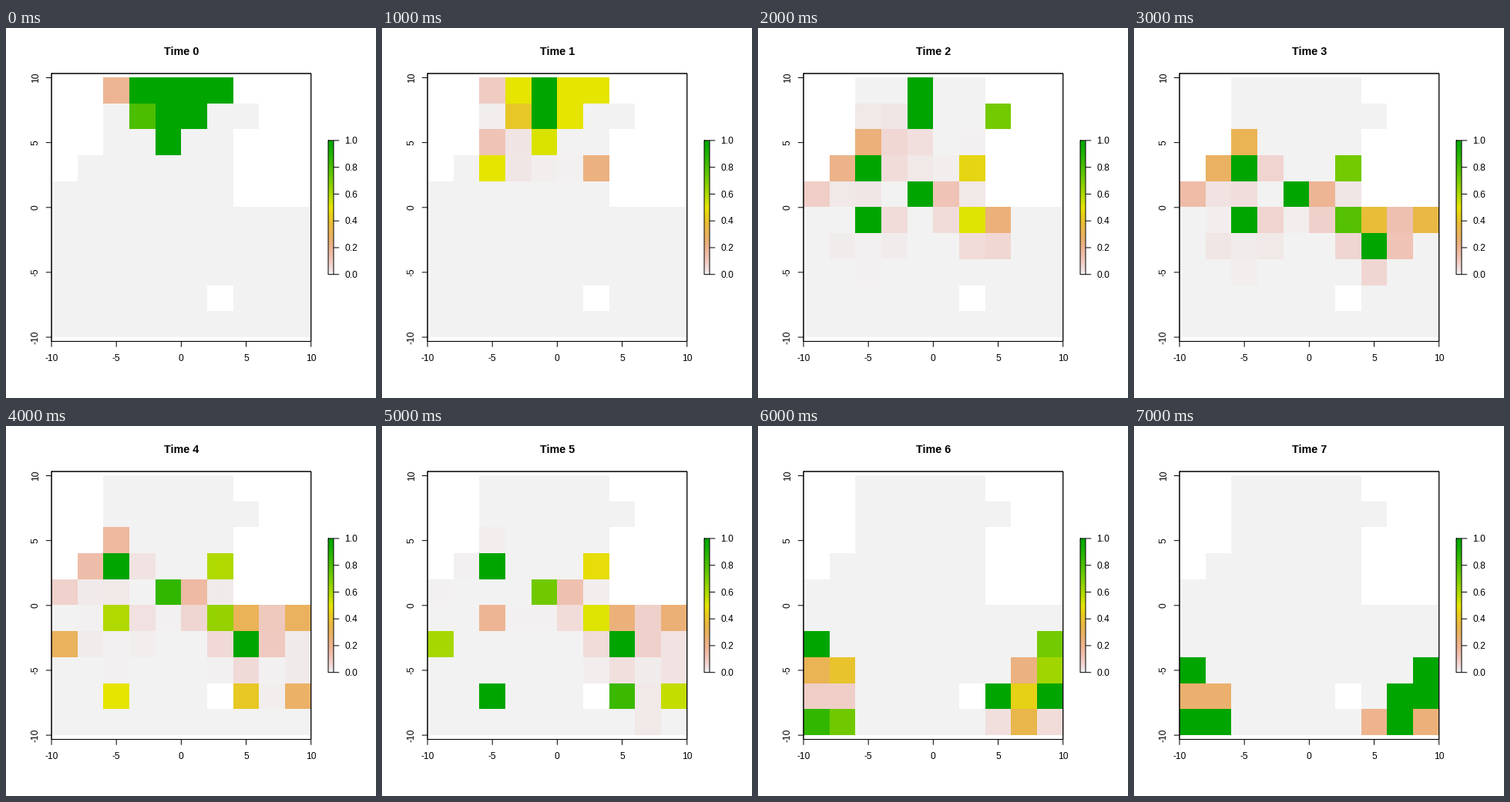
Animation, 480 px wide and 480 px high, one loop 8000 ms. Source, as a matplotlib script:

```python
import numpy as np
import matplotlib.pyplot as plt
from matplotlib.animation import FuncAnimation
from matplotlib.colors import ListedColormap, hsv_to_rgb

SIZE, DPI = 480, 100
PX = 72 / DPI
LEFT, RIGHT, TOP, BOTTOM = 59.04, 395.7, 59.04, 406.56
MAP_TOP, MAP_BOTTOM = 64.5, 401.1
BAR = (418, 425, 145.9, 319.7)

plt.rcParams["font.family"] = "Liberation Sans"


def terrain_map(n=255):
    """Light grey over yellow to green, blended in HSV."""
    t = np.linspace(0, 1, n)
    stops = (0, 0.5, 1)
    hue = np.interp(t, stops, (0, 1 / 6, 1 / 3))
    sat = np.interp(t, stops, (0, 1, 1))
    val = np.interp(t, stops, (0.95, 0.9, 0.65))
    return ListedColormap(hsv_to_rgb(np.column_stack((hue, sat, val))))


def grid(**rows):
    """Build a 10 x 10 field; each row is a list of (first column, values...)."""
    field = np.zeros((10, 10))
    for name, runs in rows.items():
        for start, *values in runs:
            field[int(name[1:]), start:start + len(values)] = values
    return field


def make_steps():
    start = grid(
        r0=[(2, .19, 1, 1, 1, 1)],
        r1=[(3, .8, 1, 1)],
        r2=[(4, 1)])
    second = grid(
        r0=[(4, 1)],
        r1=[(2, .02, .025, 1), (7, .71)],
        r2=[(2, .24, .06, .04, 0, .005)],
        r3=[(1, .21, 1, .05, .02, .01, .46)],
        r4=[(0, .085, .02, .025, .003, 1, .12, .02)],
        r5=[(2, 1, .05, .003, .05, .51, .24)],
        r6=[(1, .015, .005, .015), (6, .05, .06)],
        r7=[(2, .005)])
    third = grid(
        r2=[(2, .32)],
        r3=[(1, .29, 1, .07), (6, .71)],
        r4=[(0, .15, .035, .045, 0, 1, .19, .025)],
        r5=[(1, .01, 1, .07, .01, .08, .78, .38, .13, .35)],
        r6=[(1, .025, .015, .02), (6, .065, 1, .12)],
        r7=[(2, .01), (7, .065)])
    fifth = grid(
        r2=[(2, .01)],
        r3=[(1, .005, 1), (6, .48)],
        r4=[(0, .005), (4, .72, .13, .01)],
        r5=[(2, .19, .005, .005, .05, .51, .24, .08, .25)],
        r6=[(0, .61), (6, .05, 1, .08, .035)],
        r7=[(6, .01, .04, .015, .035)],
        r8=[(2, 1), (7, .84, .02, .56)],
        r9=[(8, .02)])
    sixth = grid(
        r6=[(0, 1), (9, .71)],
        r7=[(0, .32, .4), (8, .23, .62)],
        r8=[(0, .085, .085), (7, 1, .45, 1)],
        r9=[(0, .86, .72), (7, .04, .34, .05)])
    last = grid(
        r7=[(0, 1), (9, 1)],
        r8=[(0, .27, .27), (8, 1, 1)],
        r9=[(0, 1, 1), (7, .2, 1, .24)])

    # The flow spreads gradually: halfway states limited to the area reached.
    first = start.copy()
    first[:4, 2:7] = (start + second)[:4, 2:7] / 2
    fourth = (third + fifth) / 2
    fourth[9] = 0
    return [start, first, second, third, fourth, fifth, sixth, last]


def land_mask():
    empty = np.zeros((10, 10), bool)
    for row, (lo, hi) in enumerate([(2, 7), (2, 8), (2, 7), (1, 7), (0, 7)]):
        empty[row, :lo] = True
        empty[row, hi:] = True
    empty[8, 6] = True
    return empty


fig = plt.figure(figsize=(SIZE / DPI, SIZE / DPI), dpi=DPI, facecolor="white")
ax = fig.add_axes((0, 0, 1, 1))
ax.axis("off")


def line(xs, ys, z=3):
    ax.plot(xs, ys, color="black", lw=PX, snap=False, zorder=z,
            solid_capstyle="butt", solid_joinstyle="miter")


def box(x0, x1, y0, y1):
    line((x0, x1, x1, x0, x0, x0 + 1), (y0, y0, y1, y1, y0, y0))


def label(x, y, text, size=12, **kw):
    kw.setdefault("ha", "center")
    return ax.text(x, y, text, fontsize=size * PX, va="baseline",
                   rotation_mode="anchor", **kw)


def image(data, extent):
    x0, x1, y0, y1 = extent
    return ax.imshow(data, cmap=cmap, vmin=0, vmax=1, aspect="auto",
                     interpolation="nearest", extent=(x0, x1, y1, y0))


cmap = terrain_map()
steps = make_steps()
empty = land_mask()

field = image(np.ma.array(steps[0], mask=empty),
              (LEFT, RIGHT, MAP_TOP, MAP_BOTTOM))
image(np.linspace(1, 0, 255)[:, None], BAR)
ax.set_xlim(0, SIZE)
ax.set_ylim(SIZE, 0)

for _ in range(2):
    box(LEFT, RIGHT, TOP, BOTTOM)
box(*BAR)

for v in range(-10, 11, 5):
    part = (v + 10) / 20
    x = LEFT + part * (RIGHT - LEFT)
    y = MAP_BOTTOM - part * (MAP_BOTTOM - MAP_TOP)
    line((x, x), (BOTTOM, BOTTOM + 7.2))
    line((LEFT, LEFT - 7.2), (y, y))
    label(x, 432, str(v))
    label(42, y, str(v), rotation=90)

for i in range(6):
    y = BAR[3] - i / 5 * (BAR[3] - BAR[2])
    line((BAR[1], BAR[1] + 7.2), (y, y))
    label(439, y + 4.3, f"{i / 5:.1f}", ha="left")

title = label((LEFT + RIGHT) / 2, 35, "Time 0", 14.4, weight="bold")


def update(i):
    field.set_data(np.ma.array(steps[i], mask=empty))
    title.set_text(f"Time {i}")
    return field, title


anim = FuncAnimation(fig, update, frames=len(steps), interval=1000,
                     repeat=True, repeat_delay=0, blit=False)
plt.show()
```
